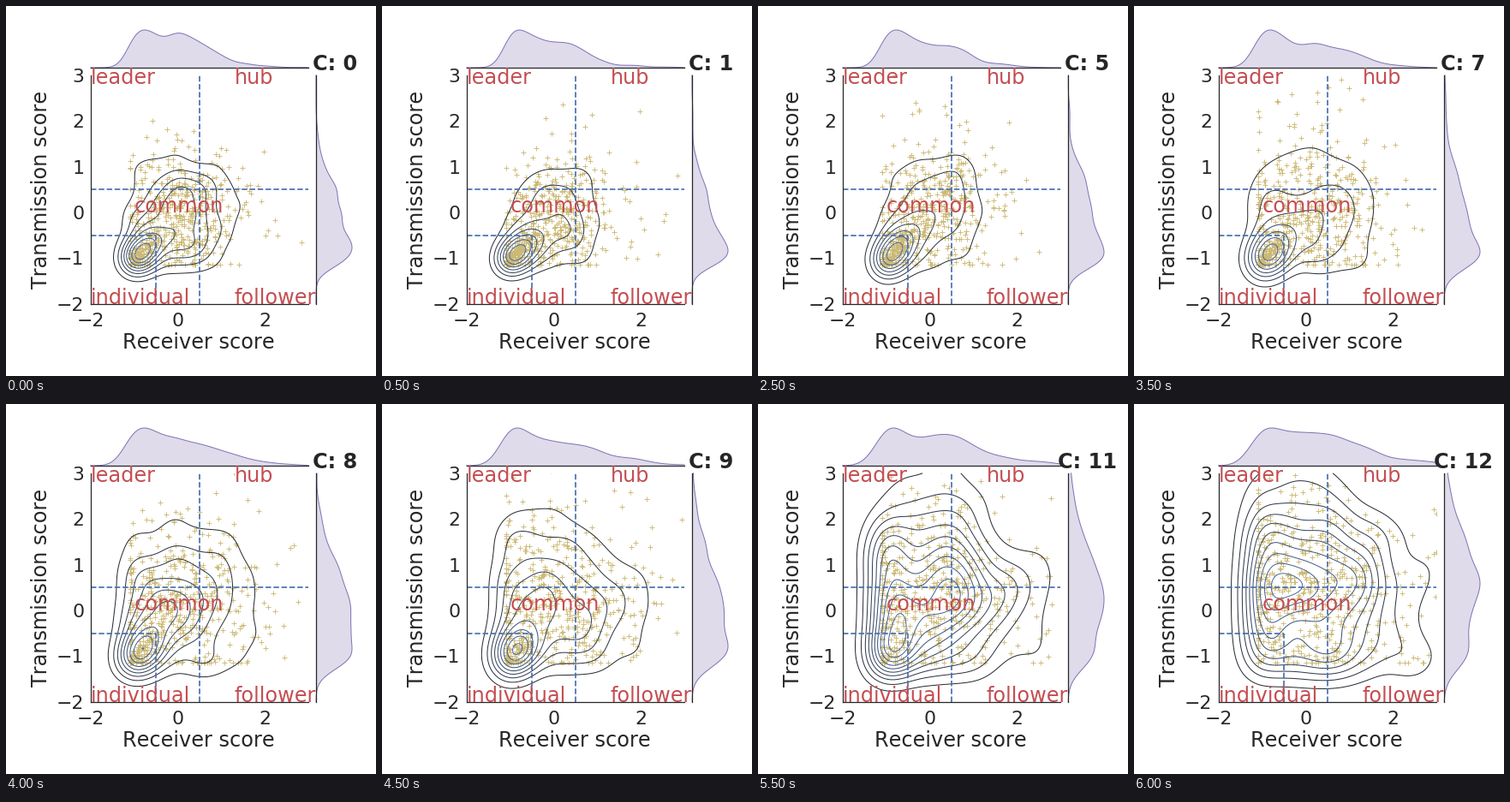
Recreate the animation shown at these times as a matplotlib script. Size 432 by 432 pixels, loop 6.5 s.

```python
import numpy as np
import matplotlib.pyplot as plt
from matplotlib.animation import FuncAnimation
from matplotlib.colors import LinearSegmentedColormap
from matplotlib.patches import Rectangle

SIZE, COUNT, POINTS = 432, 13, 560
LEFT, RIGHT, TOP, BOTTOM = 98.6, 353, 80.8, 347.8
TOP_BASE, SIDE_BASE = 72, 362
X_EDGE, Y_EDGE = -1.08, -1.15
INK, RED, BLUE, PURPLE, SAND = "#262626", "#C44E52", "#4C72B0", "#8172B2", "#CCB974"
LEVELS = LinearSegmentedColormap.from_list("levels", ["#222222", BLUE])

plt.rcParams["font.family"] = "DejaVu Sans"
plt.rcParams["text.kerning_factor"] = 6


def px(x):
    return LEFT + (x + 2) * (RIGHT - LEFT) / 5


def py(y):
    return BOTTOM - (y + 2) * (BOTTOM - TOP) / 5


def label(v):
    return str(v).replace("-", "\u2212")


def bound(rng, v, edge):
    """Put values below the edge on it or mirror them back."""
    low = v < edge
    v[low] = edge + (edge - v[low]) * rng.integers(0, 2, low.sum())
    return v


def scores(cycle):
    """A tight group of individuals in a broad crowd that widens over time."""
    rng = np.random.default_rng(70 + cycle)
    tight = rng.random(POINTS) < np.interp(cycle, [0, 3, 7, 12], [.23, .43, .22, .02])
    spread = np.interp(cycle, [0, 3, 12], [.75, .7, 1.25])
    mid_y = np.interp(cycle, [0, 7, 12], [-.1, .05, .45])

    along, across = rng.normal(0, .22, POINTS), rng.normal(0, .1, (2, POINTS))
    wide = rng.normal(0, spread, (2, POINTS)) * rng.uniform(.6, 1.4, (2, POINTS))
    x = np.where(tight, -.82 + along + across[0], .1 + wide[0])
    y = np.where(tight, -.88 + along + across[1], mid_y + wide[1])
    return bound(rng, x, X_EDGE), bound(rng, y, Y_EDGE)


def kernels(grid, data, dims):
    """Gaussian bumps with Scott's bandwidth, one column per point."""
    width = data.std() * len(data) ** (-1 / (dims + 4))
    return np.exp(-((grid[:, None] - data) / width) ** 2 / 2)


def profile(grid, data, peak):
    h = kernels(grid, data, 1).sum(axis=1)
    return peak * h / h.max()


grid = np.linspace(-2, 3, 121)

fig = plt.figure(figsize=(6, 6), dpi=72, facecolor="white")
ax = fig.add_axes([0, 0, 1, 1])
ax.axis("off")

shade = dict(facecolor=PURPLE + "40", edgecolor="none")
top_fill, = ax.fill([0, 0], [0, 0], **shade)
side_fill, = ax.fill([0, 0], [0, 0], **shade)
top_line, = ax.plot([], [], color=PURPLE, lw=1)
side_line, = ax.plot([], [], color=PURPLE, lw=1)
marks = ax.scatter([], [], s=36, marker="+", color=SAND, lw=.9, zorder=2)
marks.set_clip_path(Rectangle((LEFT, TOP), RIGHT - LEFT, BOTTOM - TOP,
                              transform=ax.transData))

for x, y in [((LEFT, LEFT), (TOP, BOTTOM)), ((LEFT, RIGHT), (BOTTOM, BOTTOM)),
             ((LEFT, RIGHT), (TOP_BASE, TOP_BASE)), ((SIDE_BASE, SIDE_BASE), (TOP, BOTTOM))]:
    ax.plot(x, y, color=INK, lw=1.25, solid_capstyle="projecting", zorder=5)

for x, y in [((-2, 3), (.5, .5)), ((.5, .5), (-2, 3)),
             ((-2, -.5), (-.5, -.5)), ((-.5, -.5), (-2, -.5))]:
    ax.plot(px(np.array(x)), py(np.array(y)), "--", color=BLUE, lw=1.75, zorder=4)

for x, y, word in [(-2, 2.8, "leader"), (1.3, 2.8, "hub"), (-1, 0, "common"),
                   (-2, -2, "individual"), (1.3, -2, "follower")]:
    ax.text(px(x), py(y), word, color=RED, size=24, zorder=6)

for v in (-2, 0, 2):
    ax.text(px(v), 374, label(v), color=INK, size=22, ha="center")
for v in range(-2, 4):
    ax.text(91.4, py(v) + 8, label(v), color=INK, size=22, ha="right")
ax.text(225.2, 400, "Receiver score", color=INK, size=24, ha="center")
ax.text(48, 214.3, "Transmission score", color=INK, size=24, rotation=90,
        rotation_mode="anchor", ha="center")
title = ax.text(384, 75, "", color=INK, size=24, weight="bold", ha="center", zorder=6)

contours = []


def update(cycle):
    x, y = scores(cycle)
    marks.set_offsets(np.column_stack([px(x), py(y)]))

    while contours:
        contours.pop().remove()
    density = kernels(grid, y, 2) @ kernels(grid, x, 2).T
    contours.append(ax.contour(px(grid), py(grid), density, 10, cmap=LEVELS,
                               linewidths=1, zorder=3))
    ax.set(xlim=(0, SIZE), ylim=(SIZE, 0))

    top = np.column_stack([px(grid), TOP_BASE - profile(grid, x, 44)])
    side = np.column_stack([SIDE_BASE + profile(grid, y, 42), py(grid)])
    top_line.set_data(*top.T)
    side_line.set_data(*side.T)
    top_fill.set_xy(np.vstack([top, [RIGHT, TOP_BASE], [LEFT, TOP_BASE]]))
    side_fill.set_xy(np.vstack([side, [SIDE_BASE, TOP], [SIDE_BASE, BOTTOM]]))
    title.set_text(f"C: {cycle}")
    return marks, top_line, side_line, top_fill, side_fill, title


anim = FuncAnimation(fig, update, frames=COUNT, interval=500, repeat=True)
plt.show()
```
